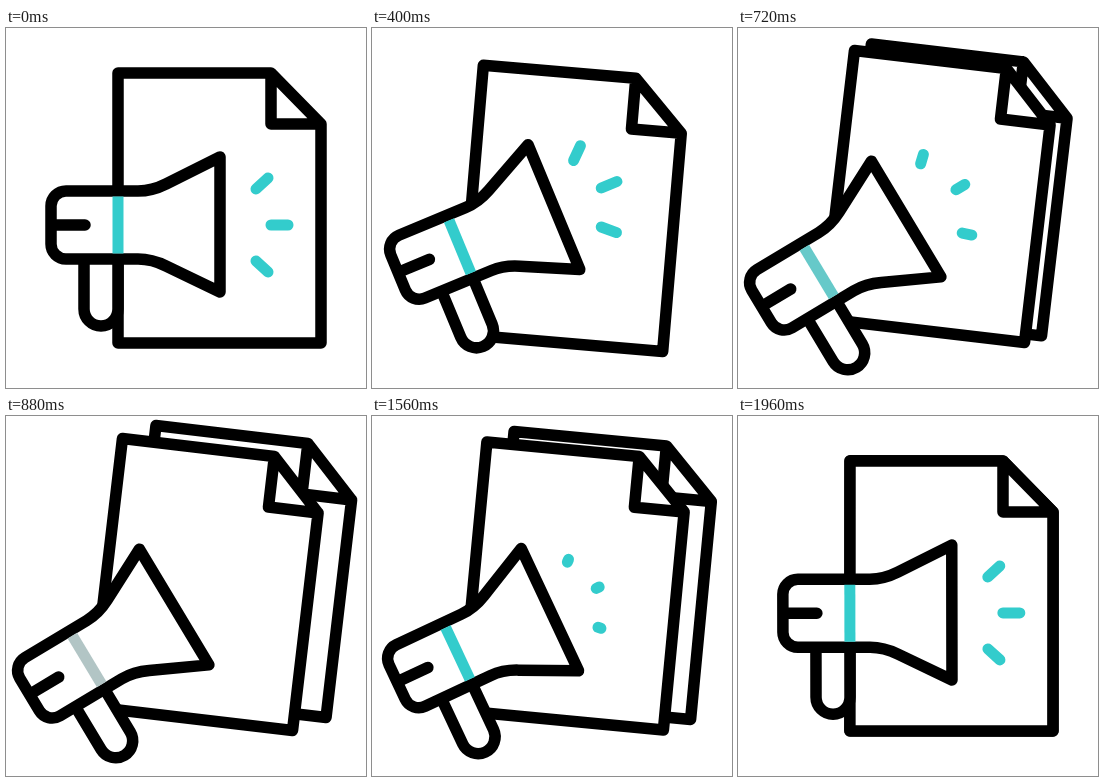
These frames come from a looping animation (360x360 px, 2000 ms). An HTML page:

```html
<!DOCTYPE html>
<html>
<head>
<meta charset="utf-8">
<style>
html, body { margin: 0; width: 100%; height: 100%; overflow: hidden; background: #fff; }
svg { display: block; width: 100vw; height: 100vh; }
</style>
</head>
<body>
<svg viewBox="0 0 360 360" fill="#fff" stroke="#000" stroke-width="11.5" stroke-linecap="round" stroke-linejoin="round">
  <defs>
    <path id="sheet" d="M112 45H265L315 96V315H112ZM315 96H265V45"/>
  </defs>
  <use id="back" href="#sheet"/>
  <use id="front" href="#sheet"/>
  <g id="horn">
    <path d="M78 231V281A17 17 0 0 0 112 281V231"/>
    <path d="M60 163H132C144 163 152 160 160 156L214 129V264L160 238C152 234 144 231 132 231H60A15 15 0 0 1 45 216V178A15 15 0 0 1 60 163Z"/>
    <path d="M50 197H79"/>
    <path id="band" d="M112 168.5V225.5" stroke-width="11" stroke-linecap="butt"/>
    <path id="rays" stroke="#33cccc" stroke-width="11"/>
  </g>
</svg>
<script>
const LOOP = 2000;
const $ = id => document.getElementById(id);
const mix = (a, b, k) => a + (b - a) * k;
const ease = (t, from, to) => {
  const k = Math.min(1, Math.max(0, (t - from) / (to - from)));
  return k * k * (3 - 2 * k);
};
const rayLines = [[250, 161, 262, 150], [265, 197, 282, 197], [250, 233, 262, 244]];
const teal = [51, 204, 204], grey = [178, 197, 197];

// Quadratic curves from rest: way out with one control point, way back with another
const pagePath = { out: [-15.5, 16.4], home: [-8, -8], end: [-12, -11.5] };
const hornPath = { out: [-19.3, -8], home: [-19, 31], end: [-31, 47] };

const along = (path, k, leaving) => {
  const bend = leaving ? path.out : path.home;
  return path.end.map((e, i) => 2 * k * (1 - k) * bend[i] + k * k * e);
};

const place = (el, [x, y], angle, cx, cy) =>
  el.setAttribute('transform', `translate(${x} ${y}) rotate(${angle} ${cx} ${cy})`);

// Visible part of each ray, as fractions from inner to outer end
function raySpan(t) {
  if (t < 900) return [ease(t, 600, 880), 1];
  if (t < 1160) return [0, ease(t, 920, 1160)];
  if (t < 1400) return [ease(t, 1160, 1400), 1];
  return [0, ease(t, 1400, 1980)];
}

function draw(t) {
  const back = 1 - ease(t, 1400, 1980);
  const k = ease(t, 20, 600) * back;
  const leaving = t < 600;

  const page = along(pagePath, k, leaving);
  place($('front'), page, 6.7 * k, 213.5, 180);
  const spread = ease(t, 600, 840) * back;
  $('back').style.display = spread ? '' : 'none';
  place($('back'), [page[0] + 33.5 * spread, page[1] - 13 * spread], 6.7 * k, 213.5, 180);

  place($('horn'), along(hornPath, k, leaving), -31 * k, 112, 197);

  const fade = ease(t, 600, 880) - ease(t, 920, 1160);
  $('band').setAttribute('stroke', `rgb(${teal.map((c, i) => Math.round(mix(c, grey[i], fade)))})`);

  const [a, b] = raySpan(t);
  $('rays').setAttribute('d', b - a < 0.01 ? '' : rayLines.map(([x, y, u, v]) =>
    `M${mix(x, u, a)} ${mix(y, v, a)}L${mix(x, u, b)} ${mix(y, v, b)}`).join(''));
}

const start = performance.now();
function tick() {
  draw((performance.now() - start) % LOOP);
  requestAnimationFrame(tick);
}
tick();
</script>
</body>
</html>
```
